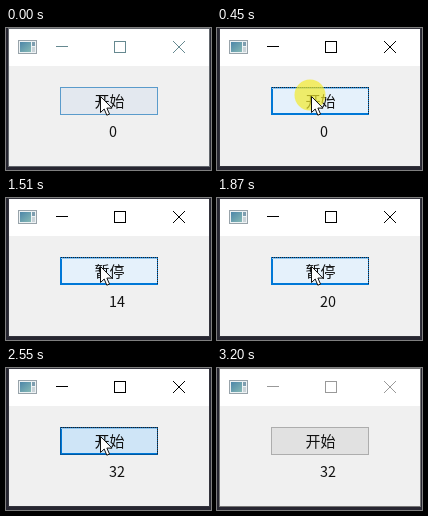
Recreate the animation shown at these times as an HTML page. Size 205x142 px, loop 3.28 s.

```html
<!DOCTYPE html>
<html lang="zh-CN">
<head>
<meta charset="utf-8">
<title>计数</title>
<style>
  html, body { margin: 0; width: 100%; height: 100%; overflow: hidden; background: #272631; }
  svg { display: block; width: 100%; height: 100%; }
  text { font-family: "Noto Sans CJK SC", "Noto Sans CJK", sans-serif; fill: #111; }
  .crisp { shape-rendering: crispEdges; }
  .anim { animation: 3280ms linear infinite; }
  .hard { animation-timing-function: step-end; }

  #edge { animation-name: edge; }
  #controls { animation-name: controls; fill: none; }
  #button { animation-name: fill, border; animation-duration: 3280ms; }
  #focus { animation-name: focus; }
  #start { animation-name: start; }
  #pause { animation-name: pause; }
  #click { animation-name: click; }
  #cursor { animation-name: move, pointer; animation-duration: 3280ms; animation-timing-function: linear, step-end; }

  @keyframes edge {
    0% { stroke: #62666c; }
    13.7% { stroke: #33333c; }
    97.56%, 100% { stroke: #777; }
  }
  @keyframes controls {
    0% { stroke: #668990; }
    13.7% { stroke: #000; }
    97.56%, 100% { stroke: #999; }
  }
  @keyframes fill {
    0%, 1.2% { fill: #e3e8ef; }
    4.88%, 13.72% { fill: #e5f1fb; }
    16.2%, 17.68% { fill: #cce4f7; }
    21.5%, 72.87% { fill: #e5f1fb; }
    75.3%, 77.44% { fill: #cce4f7; }
    80.5%, 84.5% { fill: #e5f1fb; }
    92.68%, 100% { fill: #e1e1e1; }
  }
  @keyframes border {
    0%, 1.2% { stroke: #5a9bcb; }
    4.88%, 13.72% { stroke: #0078d7; }
    16.2%, 17.68% { stroke: #005499; }
    21.5%, 72.87% { stroke: #0078d7; }
    75.3%, 77.44% { stroke: #005499; }
    80.5%, 97.55% { stroke: #0078d7; }
    97.56%, 100% { stroke: #adadad; }
  }
  @keyframes focus {
    0% { opacity: 0; }
    13.7% { opacity: 1; }
    97.56%, 100% { opacity: 0; }
  }
  @keyframes start {
    0% { opacity: 1; }
    17.68% { opacity: 0; }
    77.7%, 100% { opacity: 1; }
  }
  @keyframes pause {
    0% { opacity: 0; }
    17.68% { opacity: 1; }
    77.7%, 100% { opacity: 0; }
  }
  @keyframes click {
    0% { opacity: 0; }
    13.7% { opacity: 1; }
    17.68% { opacity: 0; }
    72.87% { opacity: 1; }
    77.7%, 100% { opacity: 0; }
  }
  @keyframes move {
    0%, 80.2% { transform: translate(94px, 68px); animation-timing-function: ease-in-out; }
    87.7%, 100% { transform: translate(154px, 128px); }
  }
  @keyframes pointer {
    0% { opacity: 1; }
    89%, 100% { opacity: 0; }
  }
</style>
</head>
<body>
<svg viewBox="0 0 205 142">
  <defs>
    <linearGradient id="glass" x2="1" y2="1">
      <stop stop-color="#4d86a8"/>
      <stop offset="1" stop-color="#86b9b5"/>
    </linearGradient>
  </defs>

  <rect width="205" height="142" fill="#272631"/>
  <rect x="3" y="1" width="200" height="137" fill="#f0f0f0"/>
  <rect x="3" y="1" width="200" height="37" fill="#fff"/>
  <rect id="edge" class="anim hard crisp" x="2.5" y=".5" width="201" height="138" fill="none"/>

  <g class="crisp">
    <rect x="12.5" y="12.5" width="18" height="13" fill="#edf2f4" stroke="#98a3aa"/>
    <rect x="14" y="14" width="11" height="10" fill="url(#glass)"/>
    <rect x="26" y="14" width="3" height="4" fill="#7e9eaf"/>
    <rect x="26" y="19" width="3" height="5" fill="#c9d3d8"/>
  </g>

  <g id="controls" class="anim hard">
    <path class="crisp" d="M50 18.5h12M108.5 13.5h11v11h-11z"/>
    <path d="M167 13l12 12M179 13l-12 12"/>
  </g>

  <rect id="button" class="anim crisp" x="54.5" y="59.5" width="97" height="27"/>
  <g id="focus" class="anim hard crisp" fill="none">
    <path d="M55.5 60v25.5h96" stroke="#0078d7"/>
    <path d="M55 60.5h96" stroke="#8fc4ec"/>
    <path d="M55 59.5h96.500v27" stroke="#222" stroke-dasharray="1 1"/>
  </g>

  <g font-size="15" text-anchor="middle">
    <text id="start" class="anim hard" x="103.500" y="79">开始</text>
    <text id="pause" class="anim hard" x="103.500" y="79">暂停</text>
  </g>
  <text id="count" x="103" y="109" font-size="14.4">0</text>

  <circle id="click" class="anim hard" cx="93" cy="67" r="15.500" fill="#f2e92c" fill-opacity=".7"/>
  <path id="cursor" class="anim" d="M.5 .5v16l3.700-3.500 2.600 6.200 2.700-1.100-2.600-6h5.100z" fill="#fff" stroke="#111"/>
</svg>
<script>
  const LOOP = 3280, COUNT_START = 597, TICK = 60.5, LAST = 32;
  const label = document.getElementById("count");
  const clock = document.getElementById("button").getAnimations()[0];

  function render() {
    const time = (clock.currentTime || 0) % LOOP;
    const ticks = Math.floor((time - COUNT_START) / TICK);
    // The last total stays until the loop restarts.
    label.textContent = Math.max(0, Math.min(LAST, ticks));
    requestAnimationFrame(render);
  }
  render();
</script>
</body>
</html>
```
